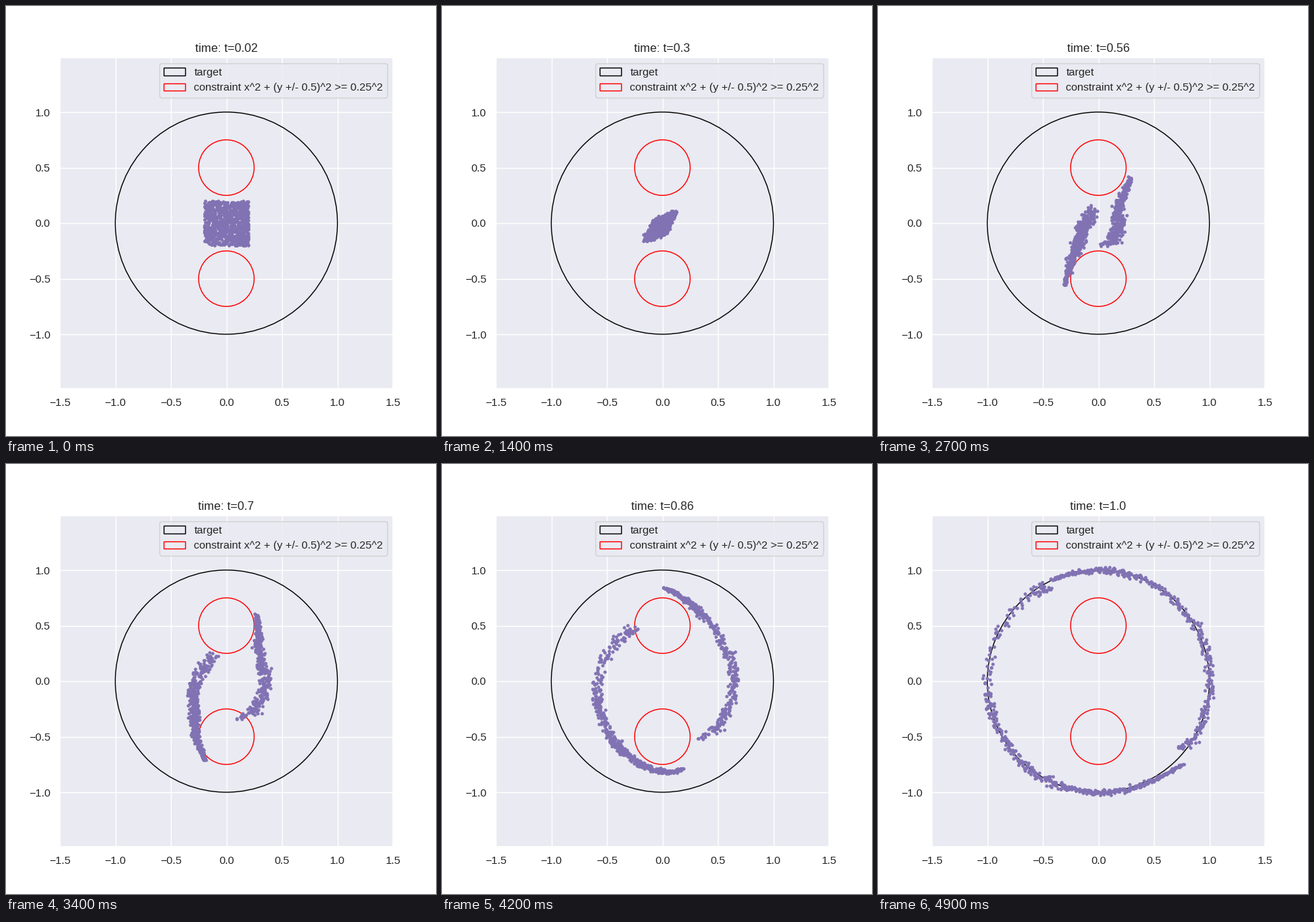
These frames come from a looping animation (600x600 px, 5000 ms). A matplotlib script:

```python
import numpy as np
import matplotlib.pyplot as plt
from matplotlib.animation import FuncAnimation

FRAMES, INTERVAL, COUNT = 50, 100, 900
INK, PANEL, DOT = "0.15", "#EAEAF2", "#8172B3"
SPLIT = 0.56  # from here on the two halves fan out towards the circle

plt.rcParams.update({
    "font.family": "Liberation Sans", "text.color": INK,
    "xtick.labelcolor": INK, "ytick.labelcolor": INK,
})

rng = np.random.default_rng(4)
square = rng.uniform(-0.2, 0.2, (COUNT, 2))
jitter = rng.normal(0, 1, (COUNT, 2))

# The square is first squeezed into a slanted blob.
total, tilt = square.sum(axis=1), square[:, 1] - square[:, 0]
blob = np.column_stack([-0.025 + 0.375 * total - 0.145 * tilt,
                        -0.03 + 0.36 * total + 0.145 * tilt]) + 0.008 * jitter
is_left = blob[:, 0] < np.quantile(blob[:, 0], 0.54)


class Half:
    """One half of the cloud; s runs from its leading particle (0) to its last (1)."""

    def __init__(self, order, share, start, end, power, flare):
        self.s = (np.argsort(np.argsort(order)) + 0.5) / len(order)
        self.start = np.interp(self.s, share, np.radians(start))
        self.end = np.interp(self.s, share, np.radians(end))
        self.power = power(self.s)
        self.flare = flare * np.exp(-self.s / 0.08)

    def at(self, t, noise):
        u = (t - SPLIT) / (1 - SPLIT)
        turn = u ** 1.5
        angle = self.start + (self.end - self.start) * turn
        reach = 1 - 0.1 * np.exp((self.s - 1) / 0.03)
        radius = reach * t ** self.power + self.flare * np.cos(2 * np.pi * turn)
        spread = (0.006 + 0.018 * np.clip(self.s / 0.7, 0, 1)) * (1.4 - 0.4 * u)
        centre = radius * np.array([np.cos(angle), np.sin(angle)])
        return centre.T + spread[:, None] * noise


left = Half(blob[is_left, 1], [0, 0.55, 0.8, 0.93, 1],
            start=[241, 223, 189, 150, 115], end=[316, 231, 186, 125, 118],
            power=lambda s: np.minimum(4, 1 + 3.3 * s ** 1.2), flare=0.065)
right = Half(-blob[~is_left, 1], [0, 0.4, 0.64, 0.97, 1],
             start=[55, 43, 4, -58, -85], end=[115, 69, 22, -37, -38],
             power=lambda s: np.minimum(3, 1.2 + 3.2 * s), flare=0)


def fan(t):
    points = np.empty((COUNT, 2))
    points[is_left] = left.at(t, jitter[is_left])
    points[~is_left] = right.at(t, jitter[~is_left])
    return points


KEY_TIMES = np.array([0.02, 0.3, SPLIT, 0.62])
POSES = np.array([square, blob, fan(SPLIT), fan(0.62)])
VELOCITY = np.gradient(POSES, KEY_TIMES, axis=0)


def positions(t):
    if t >= SPLIT:
        return fan(t)
    i = 0 if t < KEY_TIMES[1] else 1
    h = KEY_TIMES[i + 1] - KEY_TIMES[i]
    u = (t - KEY_TIMES[i]) / h
    return ((1 + 2 * u) * (1 - u) ** 2 * POSES[i]
            + u * (1 - u) ** 2 * h * VELOCITY[i]
            + u * u * (3 - 2 * u) * POSES[i + 1]
            + u * u * (u - 1) * h * VELOCITY[i + 1])


fig = plt.figure(figsize=(6, 6), dpi=100, facecolor="white")
ax = fig.add_axes([0.125, 0.11, 0.775, 0.77], facecolor=PANEL)
ax.set_xlim(-1.5, 1.5)
ax.set_ylim(-1.5 * 462 / 465, 1.5 * 462 / 465)
ax.set_xticks(np.arange(-1.5, 1.6, 0.5))
ax.set_yticks(np.arange(-1, 1.1, 0.5))
ax.tick_params(length=0, pad=9.5, labelsize=11)
ax.set_axisbelow(True)
ax.grid(color="white", linewidth=1)
for spine in ax.spines.values():
    spine.set(color="white", linewidth=1.25)


def ring(y, radius, color, label=None):
    ax.add_patch(plt.Circle((0, y), radius, fill=False, edgecolor=color,
                            linewidth=1, label=label))


ring(0, 1, "black", "target")
ring(0.5, 0.25, "red", "constraint x^2 + (y +/- 0.5)^2 >= 0.25^2")
ring(-0.5, 0.25, "red")
ax.legend(loc="upper right", fontsize=11, facecolor=PANEL, edgecolor="0.8", framealpha=0.8)
dots = ax.scatter(*square.T, s=11, color=DOT, linewidth=0, zorder=2)
title = ax.set_title("", fontsize=12)


def update(frame):
    t = round(0.02 * (frame + 1), 2)
    dots.set_offsets(positions(t))
    title.set_text(f"time: t={t}")
    return dots, title


anim = FuncAnimation(fig, update, frames=FRAMES, interval=INTERVAL,
                     repeat=True, repeat_delay=0, blit=False)
plt.show()
```
